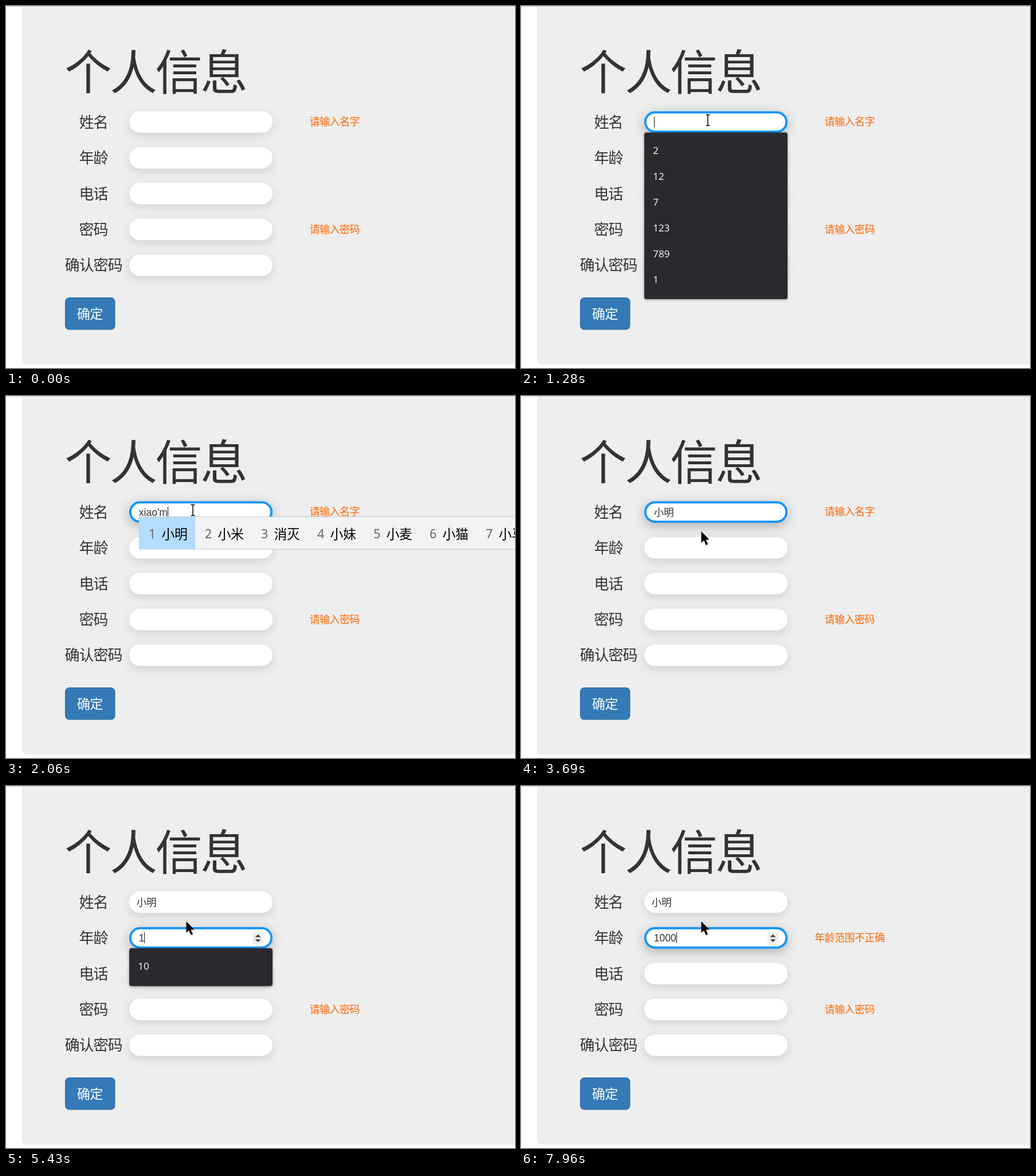
Animation, 888 px wide and 631 px high, one loop 8000 ms. Source, as an HTML page:

```html
<!DOCTYPE html>
<html lang="zh-CN">
<head>
<meta charset="utf-8">
<title>个人信息</title>
<style>
html, body { margin: 0; width: 100%; height: 100%; overflow: hidden; background: #fff; }
svg { display: block; width: 888px; height: 631px; }
text { font-family: "Noto Sans CJK SC", "Noto Sans CJK", sans-serif; fill: #333; white-space: pre; }
.title { font-size: 82.5px; letter-spacing: -3.5px; }
.label { font-size: 26px; letter-spacing: -1px; }
.hint { font-size: 18px; font-weight: 300; letter-spacing: -.5px; fill: #ff6600; }
.value { font: 17.5px "Liberation Sans", "Noto Sans CJK SC", "Noto Sans CJK", sans-serif; }
.item { font: 17px "Open Sans", "Noto Sans", sans-serif; fill: #fff; }
.num { font: 21.5px "Open Sans", "Noto Sans", sans-serif; fill: #5c5c5c; }
.word { font-size: 22.8px; letter-spacing: -.3px; fill: #000; }
.menu { fill: #292a2d; filter: drop-shadow(0 1px 2px rgba(0, 0, 0, .35)); }
.btn { fill: #337ab7; stroke: #2e6da4; stroke-width: 1.25; }
.caret { fill: #222; }
</style>
</head>
<body>
<svg id="stage" viewBox="0 0 888 631">
  <rect x="28" y="-20" width="900" height="645" rx="7.5" fill="#eee"/>
  <rect width="888" height="1" fill="#c3c6c8"/>
  <text class="title" x="102.3" y="146.4">个人信息</text>
  <g id="rows"></g>
  <rect class="btn" x="103.6" y="508.6" width="86.3" height="55.2" rx="7"/>
  <text x="123.8" y="544.8" style="font-size:23.2px;letter-spacing:-.7px;fill:#fff">确定</text>

  <text class="hint" id="nameHint" x="529.6" y="208.3">请输入名字</text>
  <text class="hint" id="ageHint" x="512" y="270.7">年龄范围不正确</text>
  <text class="hint" x="529.6" y="395.5">请输入密码</text>

  <text class="value" id="name" y="208.8"></text>
  <text class="value" id="age" x="231.8" y="271"></text>
  <g id="spin">
    <rect x="430" y="255" width="19" height="20.5" fill="#efefef"/>
    <path d="M434.5 263.5l5-5 5 5zM434.5 267.2l5 5 5-5z" fill="#444"/>
  </g>
  <rect class="caret" id="caret" width="1.1" height="19"/>

  <g id="nameMenu"></g>
  <g id="ageMenu"></g>
  <g id="ime"></g>

  <path id="beam" d="M-3.5 -9.5h2.5l1 1 1-1h2.5M0 -8.5V8.5M-3.5 9.5h2.5l1-1 1 1h2.5" fill="none" stroke="#000" stroke-width="1.5"/>
  <path id="arrow" d="M0 0V20L4.6 15.8 8.2 24 11.6 22.5 8.1 14.5H14.2Z" fill="#000"/>
</svg>
<script>
const LOOP = 8000;
const $ = id => document.getElementById(id);
const NS = 'http://www.w3.org/2000/svg';

function add(parent, tag, attrs, text) {
  const el = document.createElementNS(NS, tag);
  for (const k in attrs) el.setAttribute(k, attrs[k]);
  if (text) el.textContent = text;
  parent.append(el);
  return el;
}
const show = (el, on) => { el.style.display = on ? '' : 'none'; };
const move = (el, x, y) => el.setAttribute('transform', `translate(${x} ${y})`);
const rowY = i => 202.25 + i * 62.4;

// form rows
const inputs = ['姓名', '年龄', '电话', '密码', '确认密码'].map((label, i) => {
  const x = label.length > 2 ? 102.5 : 127.5;
  add($('rows'), 'text', { class: 'label', x, y: rowY(i) + 9.5 }, label);
  return add($('rows'), 'rect', { fill: '#fff', stroke: '#0a94ff' });
});

function setFocus(i, p) {
  const el = inputs[i], line = 3.75 * p, d = line / 2;
  const attrs = {
    x: 215 + d, y: rowY(i) - 18.75 + d,
    width: 250 - line, height: 37.5 - line,
    rx: 18.75 - d, 'stroke-width': line
  };
  for (const k in attrs) el.setAttribute(k, attrs[k]);
  el.style.filter = `drop-shadow(0 5px ${8 + 2 * p}px rgba(0,0,0,${.12 + .16 * p}))`;
}
inputs.forEach((_, i) => setFocus(i, 0));

// suggestion menus
function buildMenu(g, top, height, items) {
  add(g, 'rect', { class: 'menu', x: 215, y: top, width: 250, height, rx: 4 });
  items.forEach((s, i) => add(g, 'text', { class: 'item', x: 230.3, y: top + 37 + i * 45 }, s));
}
buildMenu($('nameMenu'), 220.5, 290.5, ['2', '12', '7', '123', '789', '1']);
buildMenu($('ageMenu'), 282.7, 66, ['10']);

// pinyin typing: [time, letters, candidates]
const typing = [
  [1510, 'x', '想 下 小 学 先 像 新 行 些'],
  [1660, 'xi', '喜欢 系 西 洗 喜 戏 细 席 吸'],
  [1760, 'xia', '下午 下 夏 吓 下班 瞎 虾 下次'],
  [1900, 'xiao', '小 笑 校 消 效 晓 销 削 孝'],
  [2060, "xiao'm", '小明 小米 消灭 小妹 小麦 小猫 小马'],
  [2440, "xiao'mi", '小米 小蜜 小咪 消弭 小迷 小秘 小谜'],
  [2820, "xiao'm", '小明 小米 消灭 小妹 小麦 小猫 小马'],
  [3070, '小明', '']
];
const ages = [[5430, '1'], [5550, '10'], [5780, '100'], [6940, '1000']];
const last = (list, t) => list.filter(e => e[0] <= t).pop();

let imeWords = null;
function setIme(words) {
  if (words === imeWords) return;
  imeWords = words;
  const g = $('ime');
  g.replaceChildren();
  if (!words) return;
  add(g, 'rect', { x: 232.5, y: 210.5, width: 700, height: 56.5, fill: '#f2f3f5', stroke: '#c9cccf' });
  let x = 233;
  words.split(' ').forEach((w, i) => {
    const width = 53 + 22.5 * w.length;
    if (!i) add(g, 'rect', { x: x - 1, y: 211, width, height: 56, fill: '#b3dcff' });
    add(g, 'text', { class: 'num', x: x + 16, y: 248 }, String(i + 1));
    add(g, 'text', { class: 'word', x: x + 38.5, y: 248.6 }, w);
    x += width;
  });
}

// progress from 0 to 1, held at n evenly spaced moments
function stepped(t, from, to, n) {
  if (t < from) return 0;
  const k = Math.min(n - 1, Math.floor((t - from) / (to - from) * (n - 1) + 1e-6));
  return (k + 1) / n;
}
const easeOut = u => 1 - (1 - u) ** 2;
const smooth = u => u * u * (3 - 2 * u);
const within = (t, a, b) => t >= a && t < b;

function drawPointer(t) {
  let x = 314.5, y = 236, beam = false;
  if (t < 880) {
    const k = (stepped(t, 500, 880, 6) * 6 - 1) / 5;
    const p = easeOut(Math.max(0, k));
    x = 733 - 407 * p;
    y = 586 - 387 * p;
  } else if (t < 3690) {
    const p = smooth(stepped(t, 3450, 3690, 4));
    x = 326 - 11.5 * p;
    y = 199 + 37 * p;
    beam = y < 221;
  }
  move($('beam'), x, y);
  move($('arrow'), x, y);
  show($('beam'), beam);
  show($('arrow'), !beam && t >= 500);
}

function draw(t) {
  const toAge = easeOut(stepped(t, 3930, 4150, 4));
  const onName = easeOut(stepped(t, 1050, 1280, 4)) * (1 - toAge);
  setFocus(0, onName);
  setFocus(1, toAge);

  const typed = last(typing, t), age = last(ages, t);
  const nameX = 227.8 + 4 * onName;
  $('name').textContent = typed ? typed[1] : '';
  $('name').setAttribute('x', nameX);
  $('age').textContent = age ? age[1] : '';
  setIme(typed ? typed[2] : '');

  show($('nameMenu'), within(t, 1200, 1510));
  show($('ageMenu'), within(t, 5430, 5550));
  show($('nameHint'), t < 3930);
  show($('ageHint'), t >= 7250);
  show($('spin'), t >= 3930);

  const inAge = t >= 3930;
  const field = inAge ? $('age') : $('name');
  const width = field.textContent ? field.getComputedTextLength() : 0;
  $('caret').setAttribute('x', Math.floor((inAge ? 231.8 : nameX) + width + .3));
  $('caret').setAttribute('y', inAge ? 255 : 193);
  const off = t < 1050 || within(t, 3610, 3930) || within(t, 4450, 5010) ||
    within(t, 6330, 6790) || within(t, 7480, 7960);
  show($('caret'), !off);

  drawPointer(t);
}

const start = performance.now();
function tick() {
  draw((performance.now() - start) % LOOP);
  requestAnimationFrame(tick);
}
tick();
</script>
</body>
</html>
```
